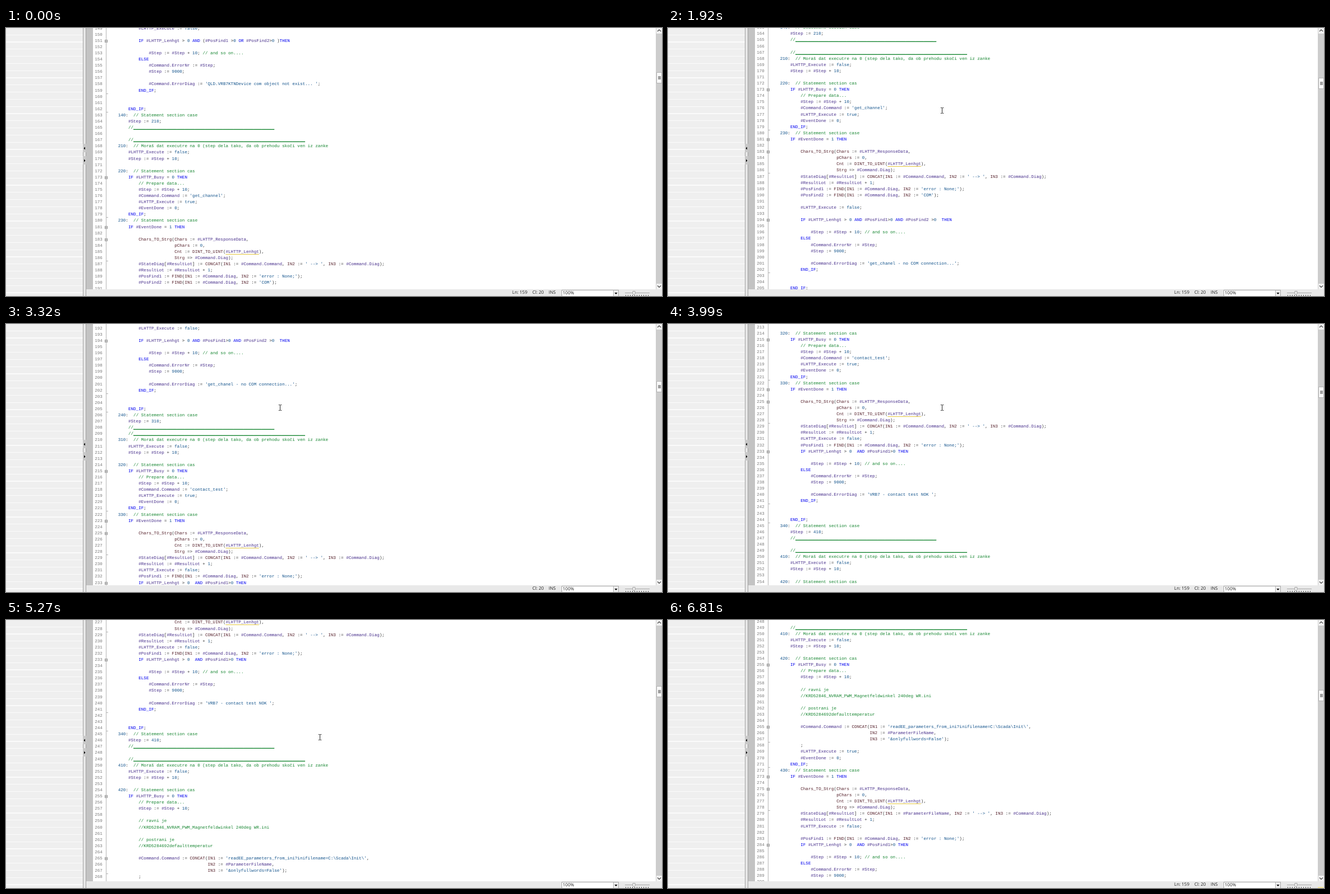
These frames come from a looping animation (1169x479 px, 6.95 s). An HTML page:

```html
<!DOCTYPE html>
<html lang="en">
<head>
<meta charset="utf-8">
<title>Code editor</title>
<style>
  html, body { margin: 0; width: 100%; height: 100%; overflow: hidden; background: #f0f0f0; }
  #stage { position: relative; width: 1169px; height: 479px; overflow: hidden; }
  #stage div, #stage i, #stage svg { position: absolute; box-sizing: border-box; }

  #panel { left: 0; top: 0; width: 137px; height: 479px;
    background: repeating-linear-gradient(#efefef 0 11.6px, #fbfbfb 11.6px 12.8px); }
  #split { left: 137px; top: 0; width: 6px; height: 479px; background: #e6e6e6;
    border: solid #a2a2a2; border-width: 0 1px; }
  .grip { left: -1px; width: 6px; height: 15px; background: #c9c9c9; }
  .grip svg { left: 0; top: 5px; }
  #band { left: 143px; top: 0; width: 12px; height: 468px; background: #c3c3c3; }

  #editor { left: 155px; top: 0; width: 1003px; height: 467px; overflow: hidden; background: #fff; }
  #rule { left: 23px; top: 0; width: 1px; height: 467px; background: #b4b4b4; }
  #code { left: 0; width: 1003px; }
  .line { left: 0; width: 1003px; height: 11px; white-space: pre; color: #333;
    font: 7.61px/11px "Liberation Mono", "Courier New", monospace; text-rendering: geometricPrecision; }
  .num, .src { top: 1px; }
  .num { left: 3.2px; color: #7c7c7c; }
  .src { left: 26.4px; }
  .fold { left: 21px; top: 3px; width: 5px; height: 5px; border: 1px solid #949494;
    background: linear-gradient(#fff 1px, #777 1px 2px, #fff 2px); }
  .end { left: 23px; top: 10px; width: 4px; height: 1px; background: #b4b4b4; }
  .com { color: #158530; }
  .str, .val { color: #14548c; }
  .tag { color: #49318c; }
  .key { color: #0000f0; }
  .fn { color: #56222c; }
  .warn { text-decoration: underline 1px #e3c53c; text-underline-offset: 1.5px; }
  .dash { text-decoration: underline 1px; text-underline-offset: 1px; text-decoration-skip-ink: none; }
  #mark { left: 27px; width: 976px; height: 11px; background: #e2fbfb; }
  #caret { left: 86px; top: 0; width: 1px; height: 11px; background: #111; }

  #bar { left: 1158px; top: 0; width: 11px; height: 467px; background: #cdcdcd; }
  .btn { left: 1px; width: 10px; height: 10px; background: #f2f2f2; }
  #thumb { left: 1px; width: 10px; height: 20px; background: #f8f8f8; border: 1px solid #b4b4b4; }
  #thumb i { left: 2px; top: 6px; width: 5px; height: 6px; background: #a0a0a0; }

  #status { left: 143px; top: 467px; width: 1026px; height: 12px; background: #e9e9e9;
    font: 8px/12px "Open Sans", "Noto Sans", sans-serif; color: #222; text-rendering: geometricPrecision; }
  #status div { top: 0; white-space: pre; }
  #status #zoom { left: 847px; top: 1px; width: 102px; height: 12px; line-height: 10px;
    background: #fff; border: 1px solid #a8a8a8; padding-left: 1px; }
  #zoom i { right: 0; top: 0; width: 9px; height: 11px; background: #eee; border-left: 1px solid #b4b4b4; }
  #status #corner { left: 1015px; top: 10px; width: 10px; height: 2px; background: #f4e79a; }
</style>
</head>
<body>
<div id="stage">
  <div id="panel"></div>
  <div id="split">
    <div class="grip" style="top:207px"><svg width="6" height="7"><path d="M4 .5V5.5L1.5 3Z"/></svg></div>
    <div class="grip" style="top:229px"><svg width="6" height="7"><path d="M2 .5V5.5L4.5 3Z"/></svg></div>
  </div>
  <div id="band"></div>
  <div id="editor">
    <div id="rule"></div>
    <div id="code"><div id="mark"><i id="caret"></i></div></div>
  </div>
  <div id="bar">
    <div class="btn" style="top:0"><svg width="10" height="10"><path d="M2 6L5 3L8 6" fill="none" stroke="#444" stroke-width="1.2"/></svg></div>
    <div id="thumb"><i></i></div>
    <div class="btn" style="top:457px"><svg width="10" height="10"><path d="M2 3.5L5 6.5L8 3.5" fill="none" stroke="#444" stroke-width="1.2"/></svg></div>
  </div>
  <div id="status">
    <div id="ln" style="left:759px">Ln: 159</div>
    <div id="cl" style="left:795px">Cl: 20</div>
    <div id="ins" style="left:824px">INS</div>
    <div id="zoom">100%<i><svg width="8" height="10"><path d="M1.5 4H6.5L4 7Z"/></svg></i></div>
    <svg style="left:959px;top:0" width="48" height="12">
      <path d="M1 6.5H45" stroke="#a6a6a6"/>
      <path d="M2 11H46" stroke="#555" stroke-width="2" stroke-dasharray="1 3"/>
      <path d="M15 3.5H19V8L17 10L15 8Z" fill="#f4f4f4" stroke="#909090" stroke-width=".8"/>
    </svg>
    <div id="corner"></div>
  </div>
  <svg id="mouse" width="7" height="13"><path d="M1 1.5H3M4 1.5H6M3.5 2V11M1 11.5H3M4 11.5H6" fill="none" stroke="#222"/></svg>
</div>

<script>
const LOOP = 6950, PITCH = 11.092, TICK = 78.3, FIRST = 149, TOP = -4.4;
const $ = id => document.getElementById(id);

const dashes = n => '        //' + '_'.repeat(n);
const note = '// Moraš dat executre na 0 (step dela tako, da ob prehodu skoči ven iz zanke';
const open = n => `    ${n}:  ${note}
        #LHTTP_Execute := false;
        #Step := #Step + 10;

    ${n + 10}:  // Statement section cas
        IF #LHTTP_Busy = 0 THEN
            // Prepare data...
            #Step := #Step + 10;`;
const run = `            #LHTTP_Execute := true;
            #EventDone := 0;
        END_IF;`;
const reply = (n, what = '#Command.Command') => `    ${n}:  // Statement section case
        IF #EventDone = 1 THEN

            Chars_TO_Strg(Chars := #LHTTP_ResponseData,
                          pChars := 0,
                          Cnt := DINT_TO_UINT(#LHTTP_Lenhgt),
                          Strg => #Command.Diag);
            #StateDiag[#ResultLot] := CONCAT(IN1 := ${what}, IN2 := ' --> ', IN3 := #Command.Diag);
            #ResultLot := #ResultLot + 1;`;
const stop = '            #LHTTP_Execute := false;';
const find = (n, text) => `            #PosFind${n} := FIND(IN1 := #Command.Diag, IN2 := '${text}');`;
const check = cond => `            IF #LHTTP_Lenhgt > 0 ${cond}

                #Step := #Step + 10; // and so on....
            ELSE
                #Command.ErrorNr := #Step;
                #Step := 9000;
`;
const fail = text => `                #Command.ErrorDiag := '${text}';
            END_IF;


        END_IF;`;
const next = n => `    ${n - 70}:  // Statement section case
        #Step := ${n};
${dashes(55)}`;
const command = name => `            #Command.Command := '${name}';`;

const code = [
  stop, '',
  check('AND (#PosFind1 >0 OR #PosFind2>0 )THEN'),
  fail('QLD.VRB7KTNDevice com object not exist... '),
  next(210), '', dashes(67),
  open(210), command('get_channel'), run,
  reply(230), find(1, 'error : None;'), find(2, 'COM'), '', stop, '',
  check('AND #PosFind1>0 AND #PosFind2 >0  THEN'),
  fail('get_chanel - no COM connection...'),
  next(310), dashes(67),
  open(310), command('contact_test'), run,
  reply(330), stop, find(1, 'error : None;'),
  check(' AND #PosFind1>0 THEN'),
  fail('VRB7 - contact test NOK '),
  next(410), '', dashes(67),
  open(410),
  String.raw`
            // ravni je
            //KRD52846_NVRAM_PWM_Magnetfeldwinkel 240deg WR.ini

            // postrani je
            //KRD5284692defaulttemperatur

            #Command.Command := CONCAT(IN1 := 'readEE_parameters_from_ini?inifilename=C:\Scada\Init\',
                                       IN2 := #ParameterFileName,
                                       IN3 := '&onlyfullwords=False');
            ;`,
  run,
  reply(430, '#ParameterFileName'), stop, '', find(1, 'error : None;'),
  check(' AND #PosFind1>0 THEN'), ''
].join('\n').split('\n');

const kinds = ['com', 'str', 'tag', 'key', 'val', 'fn'];
const token = /(\/\/.*)|('[^']*')|(#[\w.]+)|\b(IF|THEN|ELSE|END_IF|AND|OR)\b|\b(\d+|true|false)\b|([A-Za-z]\w*)/g;

function paint(text) {
  return text.replace(/&/g, '&amp;').replace(token, (word, ...groups) =>
    `<span class="${kinds[groups.findIndex((g, i) => i < 6 && g !== undefined)]}">${word}</span>`)
    .replace(/(UINT<\/span>\(<span class="tag)/, '$1 warn')
    .replace(/_{9,}/, '<span class="dash">$&</span>');
}

const rowTop = i => TOP + i * PITCH;
code.forEach((text, i) => {
  const row = document.createElement('div');
  const before = i > 0 && code[i - 1].endsWith(','), here = text.endsWith(',');
  let html = `<div class="num">${FIRST + i}</div>`;
  if (/^ *IF /.test(text) || (here && !before)) html += '<i class="fold"></i>';
  if (/END_IF/.test(text) || (before && !here)) html += '<i class="end"></i>';
  row.className = 'line';
  row.style.top = rowTop(i) + 'px';
  row.innerHTML = html + `<div class="src">${paint(text)}</div>`;
  $('code').append(row);
});
$('mark').style.top = rowTop(10) + 'px';

// Wheel ticks: the scrollbar often reacts one step before the text.
const textTicks = [1525, 1720, 1930, 2320, 3050, 3120, 3390, 3460, 3920, 4060, 4720, 5340, 5870, 6080];
const thumbTicks = [1460, 1660, 1860, 2250, 3050, 3120, 3320, 3460, 3920, 3990, 4650, 5270, 5800, 6010];
const blinks = [1460, 2250, 3320, 4650, 5270, 5800];
const path = [
  [70, 855, 320], [330, 610, 220], [600, 310, 113], [740, 271, 115], [800, 239, 115],
  [860, 345, 116], [920, 479, 117], [1120, 480, 117], [1320, 487.5, 130.5], [1520, 487.5, 130.5],
  [1790, 488.5, 147], [2450, 488.5, 147], [2520, 488.8, 147.5], [3050, 488.8, 147.5],
  [3120, 488.8, 149], [3990, 488.8, 149.5], [4930, 488.8, 149.5], [5270, 560, 210],
  [5600, 590, 235], [5730, 590, 235], [6280, 1150, 492]
];

const passed = (list, t) => list.filter(v => v <= t).length;
const show = (id, on) => { $(id).style.visibility = on ? 'visible' : 'hidden'; };

function pointer(t) {
  const i = path.findIndex(p => p[0] > t);
  if (i < 0) return path[path.length - 1].slice(1);
  if (i === 0) return path[0].slice(1);
  const [t0, x0, y0] = path[i - 1], [t1, x1, y1] = path[i];
  const k = (t - t0) / (t1 - t0);
  return [x0 + (x1 - x0) * k, y0 + (y1 - y0) * k];
}

function draw(now) {
  const t = now % LOOP;
  $('code').style.top = -TICK * passed(textTicks, t) + 'px';
  $('thumb').style.top = 79 + 3.26 * passed(thumbTicks, t) + 'px';
  show('mark', t >= 1120);
  show('ln', !blinks.some(b => t >= b && t < b + 70));
  const idle = t < 5270 || t >= 5340;
  show('cl', idle);
  show('ins', idle);
  show('corner', t >= 6810);
  show('mouse', t >= 70 && t < 6280);
  const [x, y] = pointer(Math.floor((t + 15) / 66.67) * 66.67);
  $('mouse').style.left = Math.round(x - 3.5) + 'px';
  $('mouse').style.top = Math.round(y - 6.5) + 'px';
}

const start = performance.now();
function tick() {
  draw(performance.now() - start);
  requestAnimationFrame(tick);
}
tick();
</script>
</body>
</html>
```
